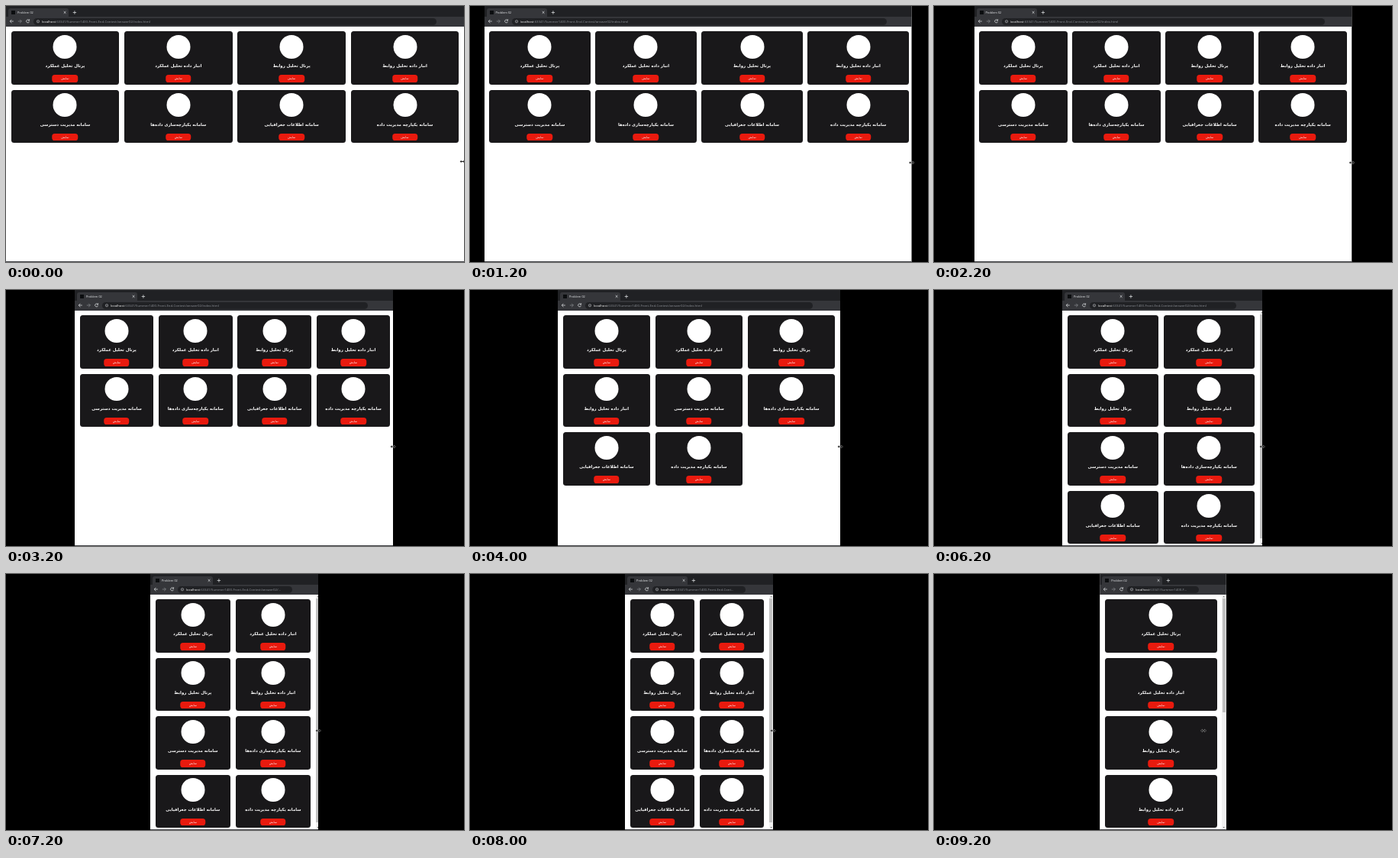
An HTML page that plays this animation: 600 by 335 pixels, repeating every 10000 ms.

```html
<!DOCTYPE html>
<html lang="en">
<head>
<meta charset="utf-8">
<title>Responsive cards</title>
<style>
html, body { margin: 0; width: 100%; height: 100%; overflow: hidden; background: #000; }
svg { position: absolute; overflow: visible; fill: none; stroke: #d5d7da; stroke-width: .8; }

.win {
  position: absolute; top: 0; height: 335px; overflow: hidden;
  container-type: inline-size;
  background: #fff;
  font-family: "Open Sans", sans-serif;
}
.win::after { content: ""; position: absolute; left: 0; right: 0; bottom: 0; height: 1px; background: #45464a; }

.tabs { position: absolute; inset: 0 0 auto; height: 14px; background: #202124; }
.tab {
  position: absolute; left: 3px; top: 3px; width: 79px; height: 11px;
  border-radius: 3px 3px 0 0; background: #35363a;
  font-size: 3.9px; line-height: 11px; color: #e8eaed; text-indent: 12px;
}
.tab i { position: absolute; left: 4px; top: 3px; width: 5px; height: 5px; background: #0b0d0f; }
.bar { position: absolute; inset: 14px 0 auto; height: 13px; background: #35363a; }
.url {
  position: absolute; left: 36px; right: 36px; top: 1.5px; height: 9.5px;
  border-radius: 5px; background: #202124;
}
.url p {
  position: absolute; left: 11px; right: 15px; top: 0; margin: 0;
  overflow: hidden; white-space: nowrap; text-overflow: ellipsis;
  font-size: 4.3px; line-height: 9.5px; color: #8f9399;
}
.url b { font-weight: 400; color: #fff; }
.left { left: 0; top: 0; }
.right { right: 0; top: 0; width: 0; }

.grid {
  position: absolute; left: 6.6px; right: 6.6px; top: 33px;
  display: grid; gap: 7px 6.6px; grid-auto-rows: 69.5px;
  grid-template-columns: repeat(4, minmax(0, 1fr));
}
.card { position: relative; border-radius: 3.5px; background: #19181a; text-align: center; color: #fff; }
.card * { position: absolute; left: 50%; transform: translateX(-50%); white-space: nowrap; margin: 0; }
.card i { top: 4.5px; width: 31px; height: 31px; border-radius: 50%; background: #fff; }
.card h2 { top: 40px; font: bold 5.4px/11px "DejaVu Sans", sans-serif; }
.card span {
  top: 57px; width: 33.5px; height: 9.5px; border-radius: 3.6px; background: #e91a0e;
  font: 3.8px/9.5px "DejaVu Sans", sans-serif;
}

.scroll { display: none; position: absolute; right: 0; top: 27px; bottom: 1px; width: 5.3px; background: #f1f1f1; }
.scroll i { position: absolute; left: .6px; right: .6px; top: 5px; height: 293px; background: #c1c1c1; }
.scroll svg { left: 0; top: 0; stroke: none; fill: #555; }

@container (max-width: 375px) { .grid { grid-template-columns: repeat(3, minmax(0, 1fr)); } }
@container (max-width: 310px) {
  .grid { grid-template-columns: repeat(2, minmax(0, 1fr)); right: 11.9px; }
  .scroll { display: block; }
}
@container (max-width: 180px) {
  .grid { grid-template-columns: minmax(0, 1fr); }
  .scroll i { height: 149px; }
}
#cursor { left: 0; top: 0; fill: #222; stroke: #fff; stroke-width: .5; paint-order: stroke; }
</style>
</head>
<body>
<div class="win" id="win">
  <div class="tabs">
    <div class="tab"><i></i>Problem 02</div>
    <svg class="left" width="1" height="1"><path d="M75.7 7l2.8 2.8m0-2.8l-2.8 2.8M87.7 8.5h4.4m-2.2-2.2v4.4"/></svg>
    <svg class="right" width="1" height="1"><path d="M-40 5h3.6M-24.5 3.2h3.4v3.4h-3.4zM-9.2 3.2l3.6 3.6m0-3.6l-3.6 3.6"/></svg>
  </div>
  <div class="bar">
    <div class="url"><p><b>localhost</b>:63341/Summer1400-Front-End-Contest/answer02/index.html</p></div>
    <svg class="left" width="1" height="1">
      <path d="M9.8 6H5.2m2.2-2.2L5.2 6l2.2 2.2"/>
      <path stroke="#85878b" d="M15.8 6h4.6m-2.2-2.2L20.4 6l-2.2 2.2"/>
      <path d="M30.3 4.8a2 2 0 1 0 .2 1.8M30.6 3.3v1.8h-1.8"/>
      <circle cx="42" cy="6.2" r="1.7" stroke-width=".5"/>
      <path stroke-width=".5" d="M42 6v1.2M42 5v.4"/>
    </svg>
    <svg class="right" width="1" height="1">
      <path stroke-width=".5" d="M-43 3.9l.7 1.5 1.7.2-1.2 1.2.3 1.7-1.5-.8-1.5.8.3-1.7-1.2-1.2 1.7-.2z"/>
      <path stroke="none" fill="#eceef0" d="M-31 4.8h1.3a.9.9 0 0 1 1.8 0h1.3v1.3a.9.9 0 0 1 0 1.8v1.1H-31V7.7a.9.9 0 0 0 0-1.6z"/>
      <circle cx="-19" cy="6" r="3.2" fill="#f1f3f4" stroke="none"/>
      <path stroke="none" fill="#35363a" d="M-20.1 5a1.1 1.1 0 1 1 2.2 0 1.1 1.1 0 1 1-2.2 0zM-21 7.7q2-1.7 4 0-2 1.7-4 0z"/>
      <path stroke-linecap="round" stroke-dasharray="0 1.7" d="M-9 4.3v4"/>
    </svg>
  </div>
  <div class="grid" id="grid"></div>
  <div class="scroll">
    <i></i>
    <svg width="5" height="308"><path d="M1.4 3.3h2.5L2.65 2zM1.4 304h2.5l-1.25 1.3z"/></svg>
  </div>
</div>
<svg id="cursor" width="1" height="1"><path d="M-3.4 0l2-1.7v1.2h2.8v-1.2l2 1.7-2 1.7V.5h-2.8v1.2z"/></svg>

<script>
const titles = [
  "پرتال تحلیل عملکرد", "انبار داده تحلیل عملکرد",
  "پرتال تحلیل روابط", "انبار داده تحلیل روابط",
  "سامانه مدیریت دسترسی", "سامانه یکپارچه&zwnj;سازی داده&zwnj;ها",
  "سامانه اطلاعات جغرافیایی", "سامانه یکپارچه مدیریت داده"
];
const win = document.getElementById("win");
const cursor = document.getElementById("cursor");
document.getElementById("grid").innerHTML = titles.map(t =>
  `<div class="card"><i></i><h2 dir="rtl">${t}</h2><span dir="rtl">نمایش</span></div>`).join("");

const LOOP = 10000, STEP = 200;
// time, half width of the window, how far the dragged edge runs ahead of the layout
const drag = [
  [400, 300, 0], [1200, 281.5, 3], [1600, 268, 0], [2800, 227, .5], [3200, 210, 3],
  [4000, 185, 0], [5000, 160, 1], [5200, 156, 1], [6200, 132, 2], [6400, 129, 0],
  [7200, 111, 2], [7600, 104, 0], [8800, 82.8, 0]
];

function sample(t) {
  const i = drag.findIndex(p => p[0] >= t);
  if (i === 0) return drag[0].slice(1);
  if (i < 0) return drag[drag.length - 1].slice(1);
  const a = drag[i - 1], b = drag[i], k = (t - a[0]) / (b[0] - a[0]);
  return [1, 2].map(j => a[j] + (b[j] - a[j]) * k);
}

function draw() {
  const t = Math.floor(performance.now() % LOOP / STEP) * STEP;
  const [half, lag] = sample(t);
  win.style.left = 300 - half + "px";
  win.style.width = 2 * half + "px";
  win.style.clipPath = `inset(0 ${lag}px 0 0)`;
  const edge = 300 + half - lag;
  const x = t < 600 ? 598 : t < 8800 ? edge : Math.max(353, 369 - (t - 8800) * .04);
  cursor.style.transform = `translate(${x}px, ${t < 600 ? 203.5 : 205}px)`;
  requestAnimationFrame(draw);
}
draw();
</script>
</body>
</html>
```
